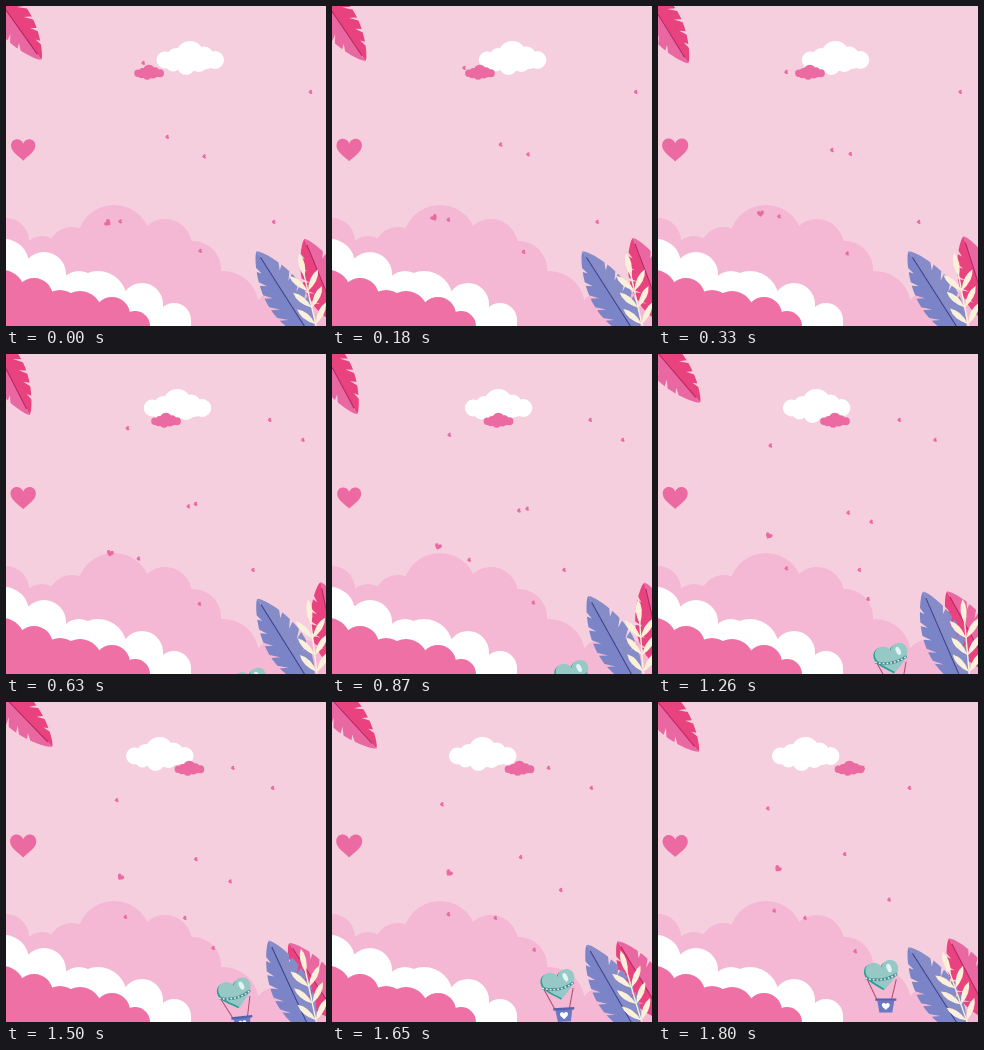
Write an HTML page with a canvas that moves like this. It is 320 px wide and 320 px high and loops after 1.83 s.

```html
<!DOCTYPE html>
<html lang="en">
<head>
<meta charset="utf-8">
<title>Pink sky</title>
<style>
  html, body { margin: 0; width: 100%; height: 100%; overflow: hidden; background: #f5cfde; }
  canvas { display: block; width: 320px; height: 320px; }
</style>
</head>
<body>
<canvas id="stage"></canvas>
<script>
const LOOP = 1830, STEP = 30, TAU = Math.PI * 2;
const PINK = '#ea6aa1';
const canvas = document.getElementById('stage');
const ctx = canvas.getContext('2d');
const dpr = window.devicePixelRatio || 1;
canvas.width = canvas.height = 320 * dpr;

// Eases in and out between a few poses, each [seconds, value].
function ease(s, ...poses) {
  let i = 0;
  while (i < poses.length - 2 && s >= poses[i + 1][0]) i++;
  const [t0, a] = poses[i], [t1, b] = poses[i + 1];
  const u = Math.min(1, Math.max(0, (s - t0) / (t1 - t0)));
  return a + (b - a) * (1 - Math.cos(Math.PI * u)) / 2;
}

function at(x, y, deg, scale, draw) {
  ctx.save();
  ctx.translate(x, y);
  ctx.rotate(deg * Math.PI / 180);
  ctx.scale(scale, scale);
  draw();
  ctx.restore();
}

function puffs(list, color) {
  ctx.fillStyle = color;
  ctx.beginPath();
  for (const [x, y, r] of list) {
    ctx.moveTo(x + r, y);
    ctx.arc(x, y, r, 0, TAU);
  }
  ctx.fill();
}

// A bank of cloud: round tops, solid down to the bottom edge.
function bank(list, color) {
  puffs(list, color);
  for (const [x, y, r] of list) ctx.fillRect(x - r, y, 2 * r, 320);
}

const BACK = [[0, 235, 23], [36, 250, 20], [66, 245, 24], [108, 236, 37], [159, 240, 27],
  [187, 263, 28], [217, 301, 36], [268, 305, 19], [300, 308, 22]];
const WHITE = [[-2, 258, 25], [38, 268, 22], [73, 285, 20], [92, 294, 29], [136, 298, 21], [168, 314, 17]];
const FRONT = [[-4, 287, 23], [28, 291, 19], [54, 304, 20], [74, 307, 22], [106, 309, 18], [129, 320, 15]];
const DRIFT = [[-25, 2, 8.5], [-14, -1, 9], [0, -3, 14], [14, -2, 9.5], [25, 2, 9],
  [-17, 6, 7.5], [-4, 8, 9], [9, 5, 9], [17, 4, 7]];

// Unit heart, one wide, centred, point down.
function heartPath() {
  ctx.beginPath();
  ctx.moveTo(0, 0.44);
  ctx.bezierCurveTo(-0.16, 0.27, -0.5, 0.08, -0.5, -0.17);
  ctx.bezierCurveTo(-0.5, -0.5, -0.1, -0.52, 0, -0.26);
  ctx.bezierCurveTo(0.1, -0.52, 0.5, -0.5, 0.5, -0.17);
  ctx.bezierCurveTo(0.5, 0.08, 0.16, 0.27, 0, 0.44);
  ctx.closePath();
}

function heart(x, y, size, deg, color) {
  at(x, y, deg, size, () => {
    heartPath();
    ctx.fillStyle = color;
    ctx.fill();
  });
}

// Feather with its base at the origin and its tip pointing up.
function feather(len, w, left, right, rib) {
  const edge = u => w * Math.pow(Math.max(0, Math.sin(Math.PI * Math.pow(u, 0.9))), 0.75);
  const half = (side, color) => {
    const point = (u, out) => ctx.lineTo(side * edge(u) * out, -u * len);
    let cut = 0.36 + side * 0.03;
    ctx.beginPath();
    ctx.moveTo(0, 0);
    for (let u = 0.02; u < 1; u += 0.02) {
      if (u > cut && u < 0.88) {
        point(cut - 0.02, 1);
        point(cut - 0.06, 0.6);
        point(cut + 0.015, 1);
        cut += 0.13;
      } else point(u, 1);
    }
    ctx.lineTo(0, -len);
    ctx.closePath();
    ctx.fillStyle = color;
    ctx.fill();
  };
  half(-1, left);
  half(1, right);
  line([[0, 0], [0, -len * 0.93]], rib, 1);
}

function leaflet(y, deg, len) {
  at(0, y, deg, 1, () => {
    ctx.beginPath();
    ctx.moveTo(0, 0);
    ctx.quadraticCurveTo(-6, -len * 0.6, 0, -len);
    ctx.quadraticCurveTo(6, -len * 0.6, 0, 0);
    ctx.fill();
  });
}

function fern() {
  const cream = '#fbf0d9';
  line([[0, 0], [0, -64]], cream, 1.4);
  ctx.fillStyle = cream;
  for (let y = -10; y > -60; y -= 17) {
    leaflet(y, -38, 24);
    leaflet(y, 38, 24);
  }
  leaflet(-58, 0, 25);
}

function line(points, color, width) {
  ctx.strokeStyle = color;
  ctx.lineWidth = width;
  ctx.beginPath();
  for (const [x, y] of points) ctx.lineTo(x, y);
  ctx.stroke();
}

function envelope() {
  ctx.save();
  ctx.scale(33, 32);
  heartPath();
  ctx.restore();
  ctx.fillStyle = '#23a199';
  ctx.fill();
  ctx.save();
  ctx.clip();
  ctx.translate(1.6, -0.8);
  ctx.scale(33, 32);
  heartPath();
  ctx.restore();
  ctx.fillStyle = '#96c9c6';
  ctx.fill();

  ctx.fillStyle = '#e3f5f2';
  ctx.beginPath();
  ctx.ellipse(9, -7, 2.3, 4.4, -0.2, 0, TAU);
  ctx.fill();

  const band = (color, width, dash) => {
    ctx.strokeStyle = color;
    ctx.lineWidth = width;
    ctx.setLineDash(dash);
    ctx.beginPath();
    ctx.moveTo(-16, -1);
    ctx.quadraticCurveTo(0, 7, 16, 0);
    ctx.stroke();
    ctx.setLineDash([]);
  };
  band('#3f8f97', 2.6, []);
  band('#f6e3ea', 1.5, [1.8, 2]);
}

// Heart balloon, origin at the middle of the heart.
function balloon() {
  for (const [a, b] of [[-14, -4], [15, 10]]) line([[a, 3], [b, 24]], '#b04a6c', 1);
  at(0, 0, -9, 1, envelope);
  ctx.fillStyle = '#6b78c4';
  ctx.beginPath();
  ctx.moveTo(-4, 24);
  ctx.lineTo(13, 24);
  ctx.lineTo(11, 36);
  ctx.lineTo(-2, 36);
  ctx.fill();
  ctx.fillStyle = '#5361ae';
  ctx.fillRect(-6, 22, 21, 2.4);
  heart(4.5, 30, 8, 0, '#fff');
}

function smallHearts(s) {
  const bit = (x, y) => heart(x, y, 4.4, 80, PINK);
  // carried along level lines, gathering speed
  bit(304.3 - 17.9 * s ** 1.85, 86);
  bit(267.5 - 45 * s ** 1.68, 216);
  if (s >= 0.56) bit(264 - 41.4 * (s - 0.56) ** 1.65, 66);
  // falling in arcs
  bit(161 + 44 * s - 16.6 * s * s, 131 + 46 * s - 19 * s * s);
  bit(137 - 30 * s + 8.2 * s * s, 57 + 27.5 * s);
  bit(ease(s, [0, 198], [0.55, 189], [1.85, 231]), 148 + 23 * (s - 0.33) ** 2);
  // swinging to and fro
  bit(ease(s, [0, 114], [0.9, 137], [1.7, 116]), 210 + 5.5 * Math.cos(TAU * s / 1.4));
  bit(ease(s, [0, 194], [0.35, 189], [1.3, 210], [2, 194]), 247.5 - 2.5 * Math.cos(TAU * s / 1.3));
  // the larger one rises
  heart(102 + 5.5 * s * s, 217 - 27.8 * s, 7, ease(s, [0, -55], [0.5, 10], [1.8, 40]), PINK);
}

function draw(s) {
  ctx.setTransform(dpr, 0, 0, dpr, 0, 0);
  ctx.fillStyle = '#f5cfde';
  ctx.fillRect(0, 0, 320, 320);

  bank(BACK, '#f4b7d4');
  smallHearts(s);
  at(184 - 20.3 * s, 52, 0, 1, () => puffs(DRIFT, '#fff'));
  at(143 + 26.9 * s, 66.3, 0, 0.44, () => puffs(DRIFT, PINK));
  heart(17.2, 144, 25 + 1.2 * Math.cos(TAU * (s - 0.4) / 1.15), 0, PINK);

  const tilt = -3.5 - 3.5 * Math.cos(TAU * (s - 1.45) / 0.75);
  at(255.5 - 17.9 * s, 342 - 24.3 * s ** 1.74, tilt, 1, balloon);

  bank(WHITE, '#fff');
  bank(FRONT, '#ef70a4');

  const sway = ease(s, [0, 0], [0.73, 1], [1.48, -1], [2.1, 0]);
  const deep = '#e8427f', soft = '#ea68a1', wine = '#b3205f';
  at(-20, -24, 144.6 + 8.6 * sway, 1, () => feather(95.5, 18, deep, soft, wine));
  at(333, 317, -22.3 + 11 * sway, 1, () => feather(91, 19, deep, soft, wine));
  at(306, 332, -ease(s, [0.5, 32.6], [1.38, 23], [1.8, 32.6]), 1,
    () => feather(103, 19.5, '#7a84c6', '#858cc8', '#3a3c86'));
  at(312, 328, -ease(s, [0, 13.2], [1.08, 3.2], [1.9, 20]), 1, fern);
}

const start = performance.now();
function tick() {
  const t = (performance.now() - start) % LOOP;
  draw(Math.floor(t / STEP) * STEP / 1000);
  requestAnimationFrame(tick);
}
tick();
</script>
</body>
</html>
```
